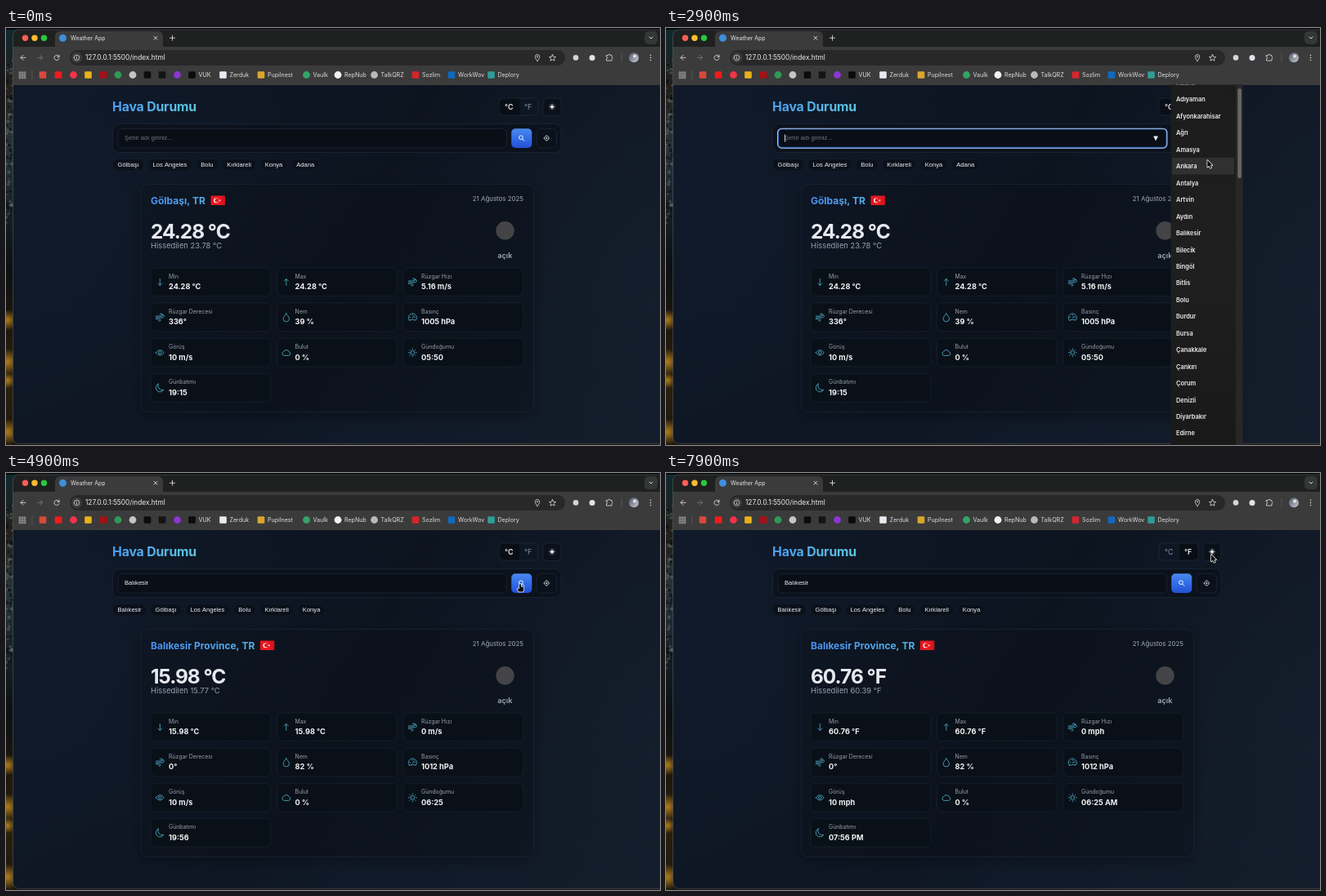
Write an HTML page with a canvas that moves like this. It is 800 px wide and 511 px high and loops after 8000 ms.

```html
<!DOCTYPE html>
<html lang="tr">
<head>
<meta charset="utf-8">
<title>Weather App</title>
<style>
html, body { margin: 0; width: 100%; height: 100%; overflow: hidden; background: #0d1422; }
canvas { display: block; width: 800px; height: 511px; }
</style>
</head>
<body>
<canvas id="stage" width="800" height="511"></canvas>
<script>
const ctx = document.getElementById('stage').getContext('2d');
const LOOP = 8000;
const INTER = 'Inter, sans-serif';
const ARIAL = '"Liberation Sans", Arial, sans-serif';
const ROW = 20.45;
const OPEN = 2300, PICK = 3500, SEARCH = 4500, RESULT = 4700, FAHRENHEIT = 6800;

const CITIES = ('Adana Adıyaman Afyonkarahisar Ağrı Amasya Ankara Antalya Artvin Aydın Balıkesir Bilecik ' +
  'Bingöl Bitlis Bolu Burdur Bursa Çanakkale Çankırı Çorum Denizli Diyarbakır Edirne Elazığ Erzincan ' +
  'Erzurum Eskişehir Gaziantep Giresun').split(' ');
const RECENT = ['Gölbaşı', 'Los Angeles', 'Bolu', 'Kırklareli', 'Konya', 'Adana'];

const LABELS = ['Min', 'Max', 'Rüzgar Hızı', 'Rüzgar Derecesi', 'Nem', 'Basınç', 'Görüş', 'Bulut', 'Gündoğumu', 'Günbatımı'];
const REPORTS = [
  { place: 'Gölbaşı, TR', temp: '24.28 °C', feels: '23.78 °C', wind: '5.16 m/s', deg: '336°', hum: '39 %', press: '1005 hPa', vis: '10 m/s', rise: '05:50', set: '19:15' },
  { place: 'Balıkesir Province, TR', temp: '15.98 °C', feels: '15.77 °C', wind: '0 m/s', deg: '0°', hum: '82 %', press: '1012 hPa', vis: '10 m/s', rise: '06:25', set: '19:56' },
  { place: 'Balıkesir Province, TR', temp: '60.76 °F', feels: '60.39 °F', wind: '0 mph', deg: '0°', hum: '82 %', press: '1012 hPa', vis: '10 mph', rise: '06:25 AM', set: '07:56 PM' }
];

// time, x, y of the pointer tip
const PATH = [
  [650, 330, 520], [1200, 262, 137.5], [1550, 262, 137.5], [2080, 598, 135], [2380, 598, 135],
  [2780, 662.3, 162], [3520, 662.3, 162], [3680, 657.5, 165.6], [3950, 657.5, 165.6], [4350, 629, 136],
  [5500, 629, 136], [5950, 636, 118], [6350, 639, 97], [7100, 639, 97], [7700, 667, 100], [8000, 667, 100]
];

const ease = u => u * u * (3 - 2 * u);
const ramp = (t, a, b) => ease(Math.min(1, Math.max(0, (t - a) / (b - a))));

function pointer(t) {
  const i = PATH.findIndex(p => p[0] > t);
  if (i < 1) return null;
  const [a, x0, y0] = PATH[i - 1], [b, x1, y1] = PATH[i], u = ramp(t, a, b);
  return { x: x0 + (x1 - x0) * u, y: y0 + (y1 - y0) * u };
}

function box(x, y, w, h, r, fill, stroke, lw = 1) {
  ctx.beginPath();
  ctx.roundRect(x, y, w, h, r);
  if (fill) { ctx.fillStyle = fill; ctx.fill(); }
  if (stroke) { ctx.strokeStyle = stroke; ctx.lineWidth = lw; ctx.stroke(); }
}
function dot(x, y, r, fill) {
  ctx.beginPath();
  ctx.arc(x, y, r, 0, 7);
  ctx.fillStyle = fill;
  ctx.fill();
}
function text(s, x, y, size, fill, weight = 400, family = INTER, spacing = 0) {
  ctx.font = `${weight} ${size}px ${family}`;
  ctx.letterSpacing = spacing + 'px';
  ctx.fillStyle = fill;
  ctx.fillText(s, x, y);
  return ctx.measureText(s).width;
}
function line(d, x, y, color, lw = 1) {
  ctx.save();
  ctx.translate(x, y);
  ctx.strokeStyle = color;
  ctx.lineWidth = lw;
  ctx.lineCap = ctx.lineJoin = 'round';
  ctx.stroke(new Path2D(d));
  ctx.restore();
}
function linear(x0, y0, x1, y1, ...colors) {
  const g = ctx.createLinearGradient(x0, y0, x1, y1);
  colors.forEach((c, i) => g.addColorStop(i / (colors.length - 1), c));
  return g;
}
function glow(x, y, r, rgb, alpha) {
  const g = ctx.createRadialGradient(x, y, 0, x, y, r);
  g.addColorStop(0, `rgba(${rgb},${alpha})`);
  g.addColorStop(1, `rgba(${rgb},0)`);
  ctx.fillStyle = g;
  ctx.fillRect(x - r, y - r, 2 * r, 2 * r);
}

const circle = (x, y, r) => `M${x - r} ${y}a${r} ${r} 0 1 0 ${2 * r} 0a${r} ${r} 0 1 0 ${-2 * r} 0`;
const rays = (a, b) => Array.from({ length: 8 }, (_, i) => {
  const c = Math.cos(i * Math.PI / 4), s = Math.sin(i * Math.PI / 4);
  return `M${c * a} ${s * a}L${c * b} ${s * b}`;
}).join('');
const WIND = 'M-5 -1.5H1.5A1.6 1.6 0 1 0 0 -3.5M-5 .3H3A1.8 1.8 0 1 0 1.5 -2M-5 2H-.5A1.3 1.3 0 1 1 -1.8 3.8';
const ICONS = [
  'M0 -4V4M-2.5 1.5L0 4L2.5 1.5',
  'M0 4V-4M-2.5 -1.5L0 -4L2.5 -1.5',
  WIND, WIND,
  'M0 -4.8C1.5 -2.2 3.7 -.4 3.7 1.6A3.7 3.7 0 0 1 -3.7 1.6C-3.7 -.4 -1.5 -2.2 0 -4.8Z',
  'M-4 3.5A5 5 0 1 1 4 3.5Q0 2 -4 3.5ZM0 1L2 -1.8M-3.3 0H-2.5M0 -3.3V-2.5M2.6 0H3.3',
  'M-5 0Q0 -6.6 5 0Q0 6.6 -5 0Z' + circle(0, 0, 1.7),
  'M-3 3.5A2.4 2.4 0 0 1 -3 -1.2A3.4 3.4 0 0 1 3.4 -.8A2.2 2.2 0 0 1 3.2 3.5Z',
  circle(0, 0, 2.4) + rays(3.9, 5),
  'M-2 -5A5.2 5.2 0 1 0 4.6 2.4A5.4 5.4 0 0 1 -2 -5Z'
];

function desktop() {
  ctx.fillStyle = linear(0, 0, 0, 511, '#10292f', '#231f19', '#28363a', '#172226', '#0c1012', '#1d170c', '#2a200e', '#1c160c');
  ctx.fillRect(0, 0, 800, 511);
  let seed = 7;
  const rnd = () => (seed = seed * 16807 % 2147483647) / 2147483647;
  for (let i = 0; i < 90; i++) {
    const y = 40 + rnd() * 200;
    dot(rnd() * 8, y, .5 + rnd() * 1.8, i % 2 ? 'rgba(6,12,15,.6)' : 'rgba(118,128,120,.4)');
  }
  for (const [y, r] of [[358, 8], [409, 10], [432, 6], [495, 10]]) {
    glow(2, y, r * 1.6, '190,135,30', .9);
  }
  ctx.fillStyle = '#08090a';
  ctx.fillRect(0, 0, 800, 2);
}

const BOOKMARKS = [
  [45, '#d9483b'], [64, '#f01c1c'], [82.5, '#f5324a', 1], [100.5, '#e9b21c'], [119, '#a80f17'], [137, '#2f9a58', 1],
  [155, '#c3c5c8', 1], [173, '#0c0c0c'], [191, '#141414'], [209.5, '#8c35d4', 1], [227.5, '#0b0b0b', 0, 'VUK'],
  [265.5, '#e8eaf2', 0, 'Zerduk'], [312, '#d9a62c', 0, 'Pupilnest'], [367.5, '#35a365', 1, 'Vaulk'],
  [406, '#f2f2f2', 1, 'RepNub'], [450.5, '#b9b9b9', 1, 'TalkQRZ'], [501, '#d3262c', 0, 'Sozlim'],
  [545, '#1168c0', 0, 'WorkWov'], [593.5, '#2f9c97', 0, 'Deplory']
];

function browser() {
  ctx.fillStyle = '#1f2020';
  ctx.fillRect(8, 2, 792, 22);
  ctx.fillStyle = '#3b3b3b';
  ctx.fillRect(8, 23, 792, 47);
  ['#fe5f57', '#febc2e', '#28c840'].forEach((c, i) => dot(23.5 + i * 11.5, 12.3, 3.7, c));

  box(60, 4, 132, 25, 6, '#3b3b3b');
  dot(69.5, 12.3, 4.5, '#3f8fdc');
  text('Weather App', 79, 14.6, 6.9, '#e6e6e6');
  line('M-2 -2L2 2M2 -2L-2 2', 183, 12.2, '#dcdcdc', .9);
  line('M-3 0H3M0 -3V3', 203.5, 12.2, '#dcdcdc', .9);
  box(781, 4, 16, 16, 5, '#353636');
  line('M-2 -1L0 1L2 -1', 789, 12, '#dcdcdc', 1);

  line('M3 0H-3M0 -3L-3 0L0 3', 21, 36.3, '#d6d6d6', .9);
  line('M-3 0H3M0 -3L3 0L0 3', 41.5, 36.3, '#777', .9);
  line('M3 -1A3.1 3.1 0 1 0 3 1.2M3 -3.2V-.9H.8', 62, 36.3, '#d6d6d6', .9);
  box(78, 27, 606, 19, 9.5, '#282828');
  dot(86.5, 36.4, 6.6, '#3b3b3b');
  line(circle(0, 0, 3.3) + 'M0 -.2V1.6M0 -1.6V-1.5', 86.5, 36.4, '#d6d6d6', .8);
  text('127.0.0.1:5500/index.html', 97, 39.3, 8.3, '#eeeeee');
  line('M0 4C-1 2.3 -2.7 .8 -2.7 -1.2A2.7 2.7 0 0 1 2.7 -1.2C2.7 .8 1 2.3 0 4Z' + circle(0, -1.2, .6), 650, 36.5, '#d0d0d0', .9);
  line('M0 -4L1.2 -1.3L4 -1L1.9 .9L2.5 3.6L0 2.2L-2.5 3.6L-1.9 .9L-4 -1L-1.2 -1.3Z', 668.5, 36.5, '#d0d0d0', .9);
  dot(697, 36.4, 3.3, '#d5d5d5');
  dot(717, 36.4, 3.5, '#dfe3ec');
  line('M-3.5 -2.5H-1.3A1.3 1.3 0 0 1 1.3 -2.5H3V-.8A1.3 1.3 0 0 1 3 1.6V4H-3.5V1.5A1.2 1.2 0 0 0 -3.5 -1Z', 738, 36, '#d0d0d0', .9);
  ctx.fillStyle = '#575757';
  ctx.fillRect(752.5, 31, 1, 11);
  dot(768, 36.2, 6, linear(762, 30, 774, 42, '#515967', '#c5c9d3'));
  dot(769, 34.5, 2.1, '#dfe1e7');
  for (const y of [33.3, 36.4, 39.5]) dot(788.5, y, .8, '#d6d6d6');

  for (let i = 0; i < 9; i++) {
    box(16 + i % 3 * 3, 53.8 + Math.floor(i / 3) * 3, 2, 2, .3, null, '#cfcfcf', .6);
  }
  ctx.fillStyle = '#575757';
  ctx.fillRect(31.5, 52, 1, 11);
  for (const [x, color, round, name] of BOOKMARKS) {
    round ? dot(x, 57.5, 4.4, color) : box(x - 4.3, 53.2, 8.6, 8.6, 1.2, color);
    if (name) text(name, x + 8, 60, 7.1, '#dddddd');
  }
}

function page() {
  ctx.fillStyle = linear(8, 70, 800, 511, '#0f1827', '#0d1420', '#131c2a');
  ctx.fillRect(8, 70, 792, 441);
  ctx.save();
  ctx.beginPath();
  ctx.rect(8, 70, 792, 441);
  ctx.clip();
  glow(60, 250, 330, '25,43,68', .16);
  glow(420, 560, 330, '22,38,62', .24);
  glow(790, 300, 330, '28,42,60', .2);
  ctx.restore();
}

function flag(x, y) {
  box(x, y, 17.5, 11.5, .8, linear(x, 0, x + 18, 0, '#e0141c', '#ee1c24', '#cf1018'));
  dot(x + 6.5, y + 5.8, 2.9, '#fff');
  dot(x + 7.3, y + 5.8, 2.3, '#e3161e');
  ctx.fillStyle = '#fff';
  ctx.beginPath();
  for (let i = 0; i < 10; i++) {
    const r = i % 2 ? .6 : 1.5, a = Math.PI + i * Math.PI / 5;
    ctx.lineTo(x + 10.9 + r * Math.cos(a), y + 5.8 + r * Math.sin(a));
  }
  ctx.fill();
}

function header(isF) {
  text('Hava Durumu', 130, 102, 15.8, linear(130, 0, 233, 0, '#4a9cf0', '#5cc8de'), 700, INTER, -.15);
  box(603, 86, 48, 21, 5, '#0e1623', '#1c2735');
  box(isF ? 628 : 603.5, 86.5, isF ? 22.5 : 24.5, 20, isF ? [0, 5, 5, 0] : [5, 0, 0, 5], '#090e16');
  text('°C', 610, 99.7, 8.8, isF ? '#8d95a1' : '#f1f3f6', isF ? 400 : 600);
  text('°F', 634, 99.7, 8.8, isF ? '#f1f3f6' : '#8d95a1', isF ? 600 : 400);
  box(657, 86, 22, 21.5, 5, '#0b111b', '#1a2432');
  dot(668, 96.5, 1.9, '#fff');
  line(rays(2.9, 3.4), 668, 96.5, '#fff', .8);
}

function searchBar(t, p) {
  const focused = t >= 1650 && t < SEARCH;
  const picked = t >= PICK;
  const over = p && p.x > 137 && p.x < 612 && p.y > 123 && p.y < 147;
  box(130.5, 117.5, 548.5, 35, 8, '#0c121d', '#182231');
  box(137, 123.5, 475.5, 23.5, 5, '#0a0f17', '#172130');
  if (focused) {
    box(137.4, 124, 474.7, 22.4, 4.2, null, '#1f55ae', 1.2);
    box(136.6, 123.2, 476.3, 24, 5, null, '#b4cff6', 1.1);
  }
  const w = text(picked ? 'Balıkesir' : 'Şehir adı giriniz...', 145, 137.3, 7.6, picked ? '#f2f4f7' : '#6f757d', 400, ARIAL);
  if (focused && (t - 1650) % 1000 < 560) {
    ctx.fillStyle = '#fff';
    ctx.fillRect(picked ? 145 + w : 145, 130.5, .8, 9);
  }
  if (focused || over) {
    ctx.fillStyle = '#f2f2f2';
    ctx.beginPath();
    ctx.moveTo(596.2, 132.5);
    ctx.lineTo(602, 132.5);
    ctx.lineTo(599.1, 138.2);
    ctx.fill();
    if (picked) line('M-2 -2L2 2M2 -2L-2 2', 590, 135, '#3478a8', 1.1);
  }
  box(618.2, 123.3, 25.1, 23.6, 5, linear(0, 123, 0, 147, '#4b8af0', '#336de6', '#234fd2'));
  line(circle(-.8, -.8, 2.4) + 'M1 1L3.3 3.3', 630.7, 135, '#fff', .9);
  box(649, 123.5, 24.5, 23.5, 5, '#0b111a', '#182231');
  line(circle(0, 0, 2.7) + 'M0 -2.8V-3.5M0 2.8V3.5M-2.8 0H-3.5M2.8 0H3.5', 661.3, 135, '#d5d9de', .7);
  dot(661.3, 135, 1, '#d5d9de');
}

function pills(names) {
  let x = 136.5;
  for (const name of names) {
    ctx.font = `400 7.6px ${ARIAL}`;
    ctx.letterSpacing = '0px';
    const w = ctx.measureText(name).width;
    box(x - 6, 160.5, w + 12, 14.5, 7.2, '#0b111b', '#141d2a', .8);
    text(name, x, 170.4, 7.6, '#eceef2', 400, ARIAL);
    x += w + 16.9;
  }
}

function weather(r) {
  ctx.save();
  ctx.shadowColor = 'rgba(0,0,0,.3)';
  ctx.shadowBlur = 16;
  ctx.shadowOffsetY = 5;
  box(165, 191.5, 480.5, 279, 9, '#0d1420');
  ctx.restore();
  box(165, 191.5, 480.5, 279, 9, linear(165, 191, 645, 471, '#0e1623', '#0c121c', '#0e1621'), '#172130');

  ctx.font = `700 12px ${INTER}`;
  ctx.letterSpacing = '0px';
  const w = ctx.measureText(r.place).width;
  text(r.place, 177, 215.6, 12, linear(177, 0, 177 + w + 24, 0, '#4a90f2', '#56b8e4'), 700);
  flag(177 + w + 6.5, 205.5);
  ctx.textAlign = 'right';
  text('21 Ağustos 2025', 633, 211.8, 7.9, '#a3abb7');
  ctx.textAlign = 'left';

  text(r.temp, 177, 257.5, 24.5, '#e6e9ef', 700, INTER, -1.05);
  text('Hissedilen ' + r.feels, 177, 270.4, 9.4, '#98a0ad');
  dot(610.5, 248.3, 11.2, '#444446');
  ctx.textAlign = 'center';
  text('açık', 610.3, 282.3, 9.1, '#a3aab5', 600);
  ctx.textAlign = 'left';

  const values = [r.temp, r.temp, r.wind, r.deg, r.hum, r.press, r.vis, '0 %', r.rise, r.set];
  LABELS.forEach((label, i) => {
    const x = 177 + i % 3 * 154.5, y = 293.8 + Math.floor(i / 3) * 43.2;
    box(x, y, 146.7, 34.8, 6, '#0a1018', '#16202d', .9);
    line(ICONS[i], x + 11.3, y + 17.6, '#4ba3be', .9);
    text(label, x + 22, y + 13, 6.9, '#98a0ad');
    text(values[i], x + 22, y + 26.4, 9.2, '#f1f3f6', 700);
  });
}

function dropdown(t, p) {
  if (t < OPEN || t >= PICK) return;
  const scroll = 13 * ramp(t, 2680, 2880) + 81.8 * ramp(t, 2920, 3350);
  ctx.save();
  ctx.beginPath();
  ctx.rect(617, 69.5, 90, 442);
  ctx.clip();
  box(617.5, 60, 88, 470, 0, linear(0, 70, 0, 511, '#1c1c1d', '#1f1f1f', '#191919'));
  box(697, 60, 8.5, 470, 0, '#272727');
  box(699.3, 71.5 + scroll * .19, 4.6, 110, 2.3, '#676767');
  CITIES.forEach((city, i) => {
    const y = 80 - scroll + i * ROW;
    if (p && p.x > 618 && p.x < 697 && Math.abs(p.y + 2 - y) < ROW / 2) box(619, y - 10.2, 76, 20.4, 1, '#303030');
    text(city, 624, y + 3, 7.4, '#ededed', 600);
  });
  ctx.restore();
}

const ARROW = new Path2D('M0 0V8.6L2 6.8L3.4 9.8L4.8 9.2L3.5 6.3H6.1Z');
const HAND = new Path2D('M-.9 .6Q0 -.5 .9 .6V3.4Q2 2.8 2.6 3.8Q3.9 3.4 4.2 4.6V7Q4 8.6 3.2 9.6H-1.4Q-2 8.2 -3.6 6.4Q-3.2 5 -1.8 5.6L-.9 6.3Z');

function cursor(p) {
  if (!p) return;
  const inside = (x, y, w, h) => p.x > x && p.x < x + w && p.y > y && p.y < y + h;
  const shape = inside(618, 123, 25.5, 24) || inside(603, 86, 48, 21) ? HAND : ARROW;
  ctx.save();
  ctx.translate(p.x, p.y);
  ctx.lineJoin = 'round';
  ctx.lineWidth = 1.5;
  ctx.strokeStyle = '#f5f5f5';
  ctx.fillStyle = '#080808';
  ctx.stroke(shape);
  ctx.fill(shape);
  ctx.restore();
}

function draw(t) {
  const p = pointer(t);
  const state = t < RESULT ? 0 : t < FAHRENHEIT ? 1 : 2;
  desktop();
  ctx.save();
  ctx.beginPath();
  ctx.roundRect(8.5, 2, 800, 507.5, 7);
  ctx.clip();
  page();
  browser();
  header(state === 2);
  searchBar(t, p);
  pills(state ? ['Balıkesir', ...RECENT.slice(0, 5)] : RECENT);
  weather(REPORTS[state]);
  ctx.restore();
  box(8.5, 2, 800, 507.3, 7, null, 'rgba(130,138,148,.38)', .9);
  dropdown(t, p);
  cursor(p);
}

const start = performance.now();
function tick(now) {
  draw(Math.max(0, now - start) % LOOP);
  requestAnimationFrame(tick);
}
requestAnimationFrame(tick);
</script>
</body>
</html>
```
